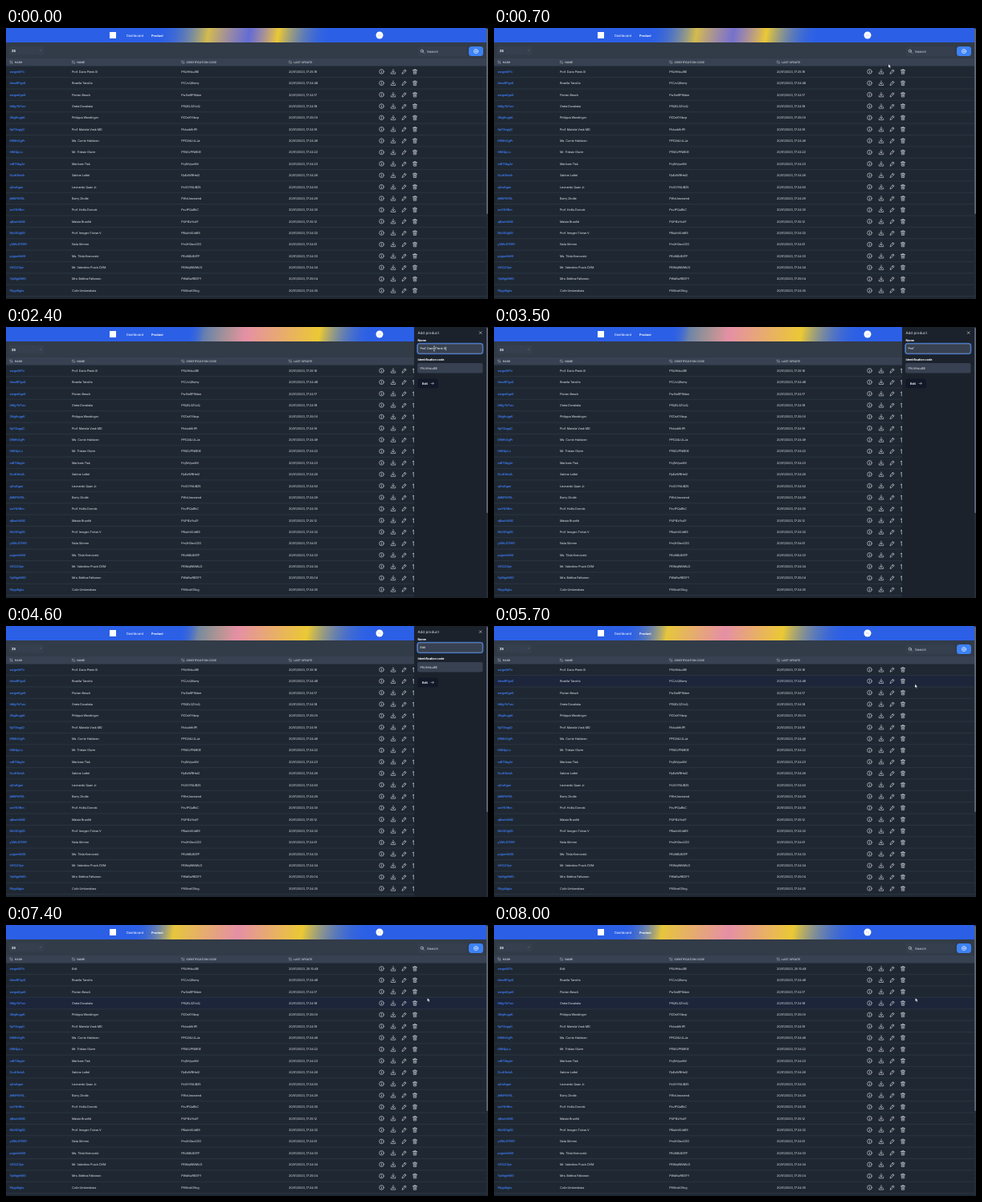
Animation, 600 px wide and 338 px high, one loop 8.1 s. Source, as an HTML page:

```html
<!DOCTYPE html>
<html lang="en">
<head>
<meta charset="utf-8">
<title>Product table</title>
<style>
  html, body { margin: 0; height: 100%; overflow: hidden; background: #1f2832; }
  svg { display: block; width: 100%; height: 100%; }
  text { font: 400 3.8px Inter, Roboto, sans-serif; letter-spacing: -.1px; fill: #dfe3ea; text-rendering: geometricPrecision; white-space: pre; }
  .hash { font-weight: 600; fill: #3f7cf6; }
  .head { font-size: 3.4px; font-weight: 600; letter-spacing: 0; fill: #c3cad5; }
  .nav { font-size: 4.1px; letter-spacing: 0; fill: #fff; }
  .bold { font-weight: 700; fill: #fff; }
  .line { fill: none; stroke: #dfe3ea; stroke-width: .6; stroke-linecap: round; stroke-linejoin: round; }
</style>
</head>
<body>
<svg viewBox="0 0 600 338" preserveAspectRatio="none">
  <defs>
    <linearGradient id="glow" gradientUnits="userSpaceOnUse" x1="150" y1="0" x2="480" y2="55">
      <stop stop-color="#2b5fe6" stop-opacity="0"/>
      <stop stop-color="#e6c63c"/>
      <stop stop-color="#e58fa6"/>
      <stop stop-color="#ebc934"/>
      <stop stop-color="#2b5fe6" stop-opacity="0"/>
    </linearGradient>
    <g id="sort" class="line" style="stroke:#c3cad5;stroke-width:.4">
      <path d="M.8 1.6V-1.6M0-.8L.8-1.6L1.6-.8M3-1.6V1.6M2.2.8L3 1.6L3.8.8"/>
    </g>
    <g id="actions" class="line">
      <circle cx="467.5" r="2.8"/>
      <path d="M467.5-.1V1.4M467.5-1.4V-1.3"/>
      <path d="M482-2.8V1M480.4-.5L482 1.1L483.6-.5M479.3 1V2.7H484.7V1"/>
      <path d="M493.2 2.5L493.7.5L496.8-2.5L498.1-1.2L495.1 1.9ZM496-1.7L497.3-.4"/>
      <path d="M506.5-1.8H511.5M507.1-1.8L507.4 2.8H510.6L510.9-1.8M508.1-1.9V-2.8H509.9V-1.9M508.4-.4V1.5M509.6-.4V1.5"/>
    </g>
  </defs>

  <rect width="600" height="338" fill="#1f2832"/>
  <rect width="598" height="18" fill="#2b5fe6"/>
  <rect x="150" width="330" height="18" fill="url(#glow)"/>
  <rect x="129" y="5" width="8" height="8" fill="#fff"/>
  <text class="nav" x="150" y="11">Dashboard</text>
  <text class="nav bold" x="181" y="11" style="font-size:3.8px">Product</text>
  <circle cx="465" cy="9" r="4.5" fill="#fff"/>
  <text x="465" y="10.2" text-anchor="middle" style="font-size:3px;fill:#b9c6ea">AB</text>

  <rect y="18" width="598" height="20" fill="#323b48"/>
  <rect y="38" width="598" height="9.5" fill="#374151"/>
  <rect x="4" y="22.5" width="43" height="11" rx="1.5" fill="#353f4d"/>
  <text class="bold" x="7" y="29.5" style="font-size:4.1px">25</text>
  <path class="line" d="M42 27.4L43 28.4L44 27.4" style="stroke:#8b95a5;stroke-width:.4"/>
  <rect x="513" y="23" width="61" height="12" rx="2" fill="#353f4d"/>
  <circle class="line" cx="517.8" cy="28.6" r="1.6"/>
  <path class="line" d="M519 29.8L520.4 31.2"/>
  <text x="524" y="30.5" style="font-size:4.2px;letter-spacing:0">Search</text>
  <rect x="576" y="23" width="18" height="12" rx="3.5" fill="#3d82f3"/>
  <g class="line" style="stroke:#fff"><circle cx="585" cy="29" r="2.6"/><path d="M583.8 29H586.2M585 27.8V30.2"/></g>

  <rect id="hover" width="598" height="14.1" fill="#1c2539"/>
  <g id="table"></g>

  <g id="drawer">
    <rect x="508" width="92" height="338" fill="#1b222c"/>
    <text x="512.5" y="9.2" style="font-size:4.5px;letter-spacing:0">Add product</text>
    <path class="line" d="M589.3 5.8L592.1 8.6M592.1 5.8L589.3 8.6"/>
    <text class="bold" x="512.5" y="17.6">Name</text>
    <rect x="512.3" y="20.8" width="81" height="12.4" rx="2.2" fill="#374151" stroke="#dce6fb" stroke-width=".5"/>
    <rect x="511.8" y="20.3" width="82" height="13.4" rx="2.6" fill="none" stroke="#3c7df2" stroke-width=".8"/>
    <text id="field" x="515.5" y="28.4" style="fill:#fff"></text>
    <path id="caret" d="M0 24.7V29.4" stroke="#fff" stroke-width=".5"/>
    <text class="bold" x="512.5" y="42.4">Identification code</text>
    <rect x="512" y="45" width="81.5" height="12.6" rx="2" fill="#374151"/>
    <text x="515.5" y="52.7">PfiUHhkuI8E</text>
    <rect x="512.5" y="64.5" width="25.5" height="11.7" rx="2.5" fill="#111827"/>
    <text class="bold" x="518" y="71.8">Edit</text>
    <path class="line" d="M529 70.4H532.4M531.2 69.2L532.4 70.4L531.2 71.6" style="stroke-width:.5"/>
  </g>

  <rect x="598" width="2" height="338" fill="#252d38"/>
  <rect x="598.2" y="1" width="1.6" height="231" rx=".8" fill="#697180"/>
  <path id="beam" d="M-1-2.8H1M0-2.8V2.8M-1 2.8H1" stroke="#e8ebf0" stroke-width=".5" fill="none"/>
  <path id="arrow" d="M0 0V4.6L1.1 3.6L1.9 5.3L2.7 4.9L1.9 3.3H3.3Z" fill="#fff" stroke="#10151d" stroke-width=".3"/>
</svg>
<script>
const LOOP = 8100, TOP = 54.4, PITCH = 14.37;
const rows = `wegwWTv|Prof. Dario Plenk III|PfiUHhkuI8E|25:18
hlewRPgxD|Rosella Tandrix|PlCJvQ6smy|24:48
wegwKgeK|Florian Besch|PwSwRP5kbm|24:17
hWgYk7wv|Greta Dovalska|PflQEL3ZVzQ|24:18
3NgKogpK|Philippa Wendinger|PZOxKYtbcp|25:00
6pTSegqD|Prof. Mariela Vosk MD|PblczbKrIPl|24:19
E9MhOgPr|Ms. Corrie Haldwen|PPD2ALULJa|24:49
h1MQpLx|Mr. Tristan Glurm|PfWLVPNI80E|24:22
mBTSbgAr|Marlowe Tisk|Poj1hVpwNV|24:23
5LxKNdvA|Sabine Lottel|PpEzWRHeI2|24:26
qXwZgan|Leonardo Quav Jr.|PxGSYNUBZ5|24:50
jMNPNT6L|Barry Zindle|PWxUeoeamd|24:29
wcYK9Rm|Prof. Hollis Dornek|PxvIPQuRkC|24:30
qBeahVM2|Maisie Brunfel|PUPlEzYo4F|25:12
RkOSGgED|Prof. Imogen Tolvar V|PBubhXUd69|24:32
yZMLSTRRY|Nola Strimm|Pm2H3eoOZG|24:51
pxjpm6kR9|Ms. Tilda Krenovski|PExNBLBXFF|24:33
V87J23jw|Mr. Valentino Pruck DVM|PEWqWtMWJ3|24:34
YpMgrM9G|Mrs. Bettina Fallowen|PWd6wRB3FY|25:04
PAgzBgkx|Colin Umbershaw|P9XkwIG5ng|24:35`.split("\n").map(r => r.split("|"));
const columns = [[4.5, "HASH"], [82, "NAME"], [218.3, "IDENTIFICATION CODE"], [352, "LAST UPDATE"]];
const $ = id => document.getElementById(id);

const label = (x, y, s, attrs = "") => `<text x="${x}" y="${y}" ${attrs}>${s}</text>`;
let html = columns.map(([x, s]) =>
  `<use href="#sort" x="${x}" y="42.6"/>` + label(x + 6.2, 43.9, s, 'class="head"')).join("");
rows.forEach(([hash, name, code, time], i) => {
  const y = TOP + i * PITCH, base = y + 1.4;
  html += label(4.5, base, hash, 'class="hash"') + label(82, base, name, `id="name${i}"`) +
    label(218.3, base, code) + label(352, base, "20/01/2023, 17:" + time, `id="date${i}"`) +
    `<use href="#actions" y="${y}"/><path d="M0 ${y + 7.2}H598" stroke="#374151" stroke-width=".5"/>`;
});
$("table").innerHTML = html;

// Linear interpolation through [time, ...values] keys
function at(keys, t) {
  const i = keys.findIndex(k => k[0] > t);
  if (i < 0) return keys[keys.length - 1].slice(1);
  if (i === 0) return keys[0].slice(1);
  const a = keys[i - 1], b = keys[i], u = (t - a[0]) / (b[0] - a[0]);
  return a.slice(1).map((v, j) => v + (b[j + 1] - v) * u);
}
const show = (id, on) => $(id).setAttribute("visibility", on ? "visible" : "hidden");
const move = (id, x, y) => $(id).setAttribute("transform", `translate(${x} ${y})`);

// Five stop positions, then opacity of the first yellow and of the pink
const glow = [
  [0, 188, 250, 300, 335, 400, .9, .3],
  [700, 192, 250, 295, 335, 400, .9, .4],
  [2400, 225, 245, 295, 385, 450, .3, 1],
  [4600, 215, 238, 285, 370, 450, .4, 1],
  [5700, 165, 215, 285, 355, 435, 1, 1],
  [6700, 160, 208, 283, 360, 442, 1, 1],
  [8100, 160, 208, 290, 368, 450, 1, 1]];
const mouse = [
  [100, 600, 62], [400, 530, 38], [700, 491, 45], [900, 495, 53], [1300, 495, 53],
  [1900, 533, 27], [4600, 533, 27], [5200, 524, 71], [5700, 524, 72.5],
  [6000, 524, 72.5], [6500, 524.5, 91]];
const slide = [[1100, 92], [1400, 0], [5400, 0], [5700, 92]];
const erase = [[2700, 1], [3700, 0]];
const type = [[3800, 0], [4300, 4]];

function draw(t) {
  const g = at(glow, t);
  document.querySelectorAll("#glow stop").forEach((s, i) => {
    s.setAttribute("offset", (g[i] - 150) / 330);
    if (i === 1 || i === 2) s.setAttribute("stop-opacity", g[i + 4]);
  });

  const saved = t >= 6000, full = rows[0][1];
  $("name0").textContent = saved ? "Edit" : full;
  $("date0").textContent = "20/01/2023, " + (saved ? "20:10:48" : "17:25:18");

  const [x] = at(slide, t);
  show("drawer", x < 92);
  move("drawer", x, 0);
  $("field").textContent = t < 3800
    ? full.slice(0, Math.round(full.length * at(erase, t)[0]))
    : "Edit".slice(0, Math.floor(at(type, t)[0]));
  const open = x === 0;
  show("caret", open && t % 1000 < 500);
  move("caret", 515.7 + $("field").getComputedTextLength(), 0);

  const [mx, my] = at(mouse, t);
  const inField = open && my < 33 && mx > 512;
  const hidden = t < 100 || (t >= 2700 && t < 4700);
  show("beam", inField && !hidden);
  show("arrow", !inField && !hidden);
  move("beam", mx, my);
  move("arrow", mx, my);

  const row = Math.floor((my - TOP + 7.2) / PITCH);
  show("hover", row >= 0 && !hidden && (x === 92 || mx < 508 + x));
  $("hover").setAttribute("y", TOP - 7 + row * PITCH);
}

const start = performance.now();
function tick() {
  draw(Math.floor((performance.now() - start) % LOOP / 100) * 100);
  requestAnimationFrame(tick);
}
tick();
</script>
</body>
</html>
```
